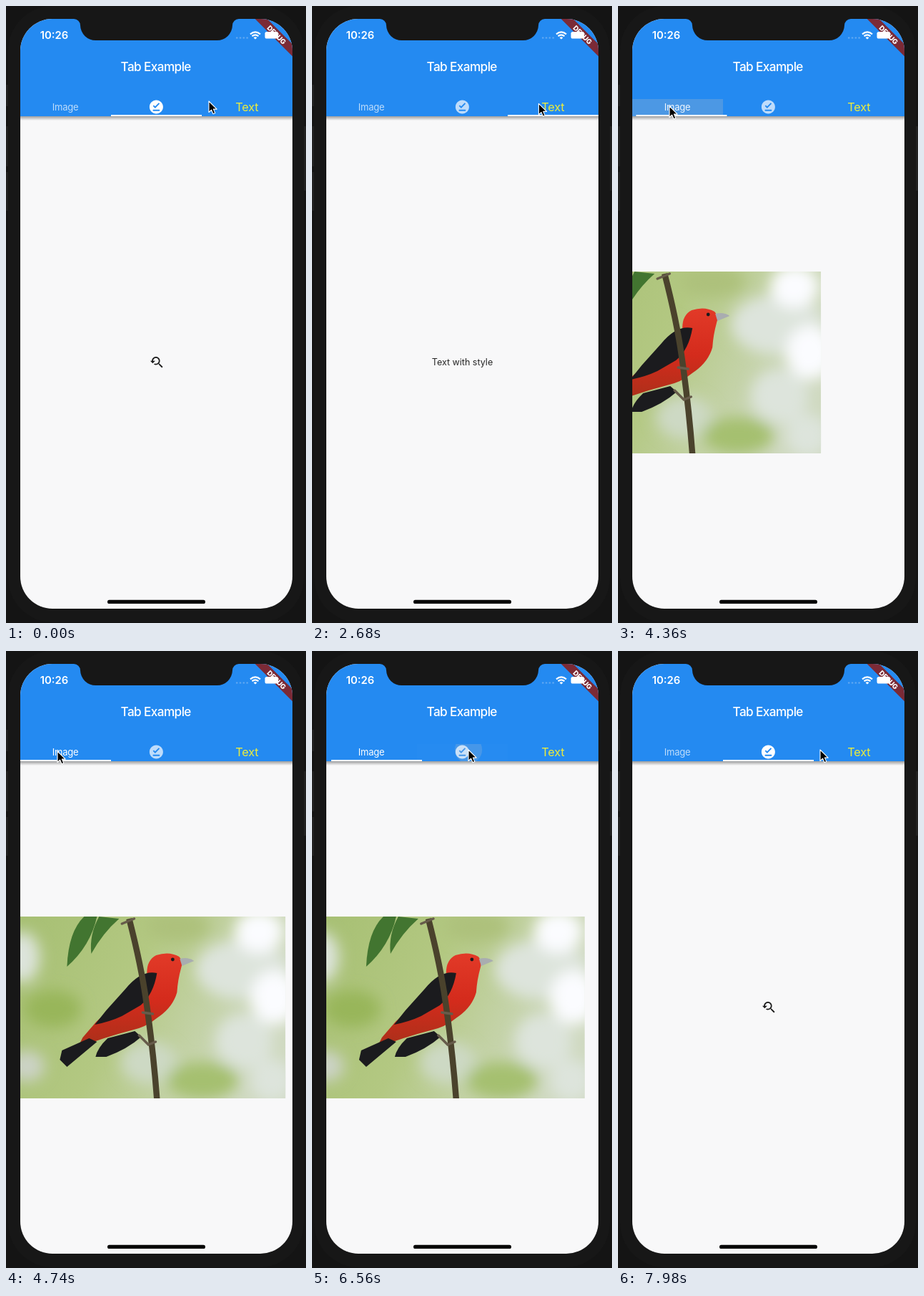
Animation, 420 px wide and 862 px high, one loop 8000 ms. Source, as an HTML page:

```html
<!DOCTYPE html>
<html lang="en">
<head>
<meta charset="utf-8">
<title>Tab Example</title>
<style>
  html, body { margin: 0; width: 100%; height: 100%; overflow: hidden; background: #141414; }
  svg { display: block; width: 100%; height: 100%; }
  text { font-family: Inter, "Open Sans", sans-serif; text-anchor: middle; }
</style>
</head>
<body>
<svg viewBox="0 0 420 862">
  <defs>
    <clipPath id="screen"><rect x="20" y="18" width="381" height="824" rx="45"/></clipPath>
    <clipPath id="photoBox"><rect x="20" y="371" width="381" height="254"/></clipPath>
    <clipPath id="tabBox"><rect id="tabRect" y="130" width="127" height="24"/></clipPath>
    <filter id="blur" x="-50%" y="-50%" width="200%" height="200%"><feGaussianBlur stdDeviation="10"/></filter>
    <linearGradient id="shade" x2="0" y2="1">
      <stop stop-color="#444" stop-opacity=".5"/>
      <stop offset="1" stop-color="#444" stop-opacity="0"/>
    </linearGradient>
    <linearGradient id="meadow" x2="1" y2=".3">
      <stop stop-color="#a6bf72"/>
      <stop offset=".5" stop-color="#b3c882"/>
      <stop offset="1" stop-color="#cfd9c0"/>
    </linearGradient>
    <linearGradient id="plumage" x2="0" y2="1">
      <stop stop-color="#e23a28"/>
      <stop offset=".5" stop-color="#d42b1c"/>
      <stop offset="1" stop-color="#a8301a"/>
    </linearGradient>
  </defs>

  <!-- phone body -->
  <rect width="420" height="862" fill="#141414"/>
  <g fill="#202020">
    <rect y="110" width="4" height="30"/>
    <rect y="168" width="4" height="56"/>
    <rect y="232" width="4" height="54"/>
    <rect x="416" y="168" width="4" height="90"/>
  </g>
  <rect x="3" y="0" width="414" height="861" rx="62" fill="#171717"/>

  <g clip-path="url(#screen)">
    <rect x="20" y="18" width="381" height="824" fill="#f8f8f9"/>

    <!-- pages -->
    <g id="page0">
      <g clip-path="url(#photoBox)">
        <rect x="20" y="371" width="381" height="254" fill="url(#meadow)"/>
        <g filter="url(#blur)">
          <g fill="#dde4dc">
            <ellipse cx="32" cy="428" rx="25" ry="36"/>
            <ellipse cx="340" cy="445" rx="65" ry="42"/>
            <ellipse cx="343" cy="545" rx="40" ry="38"/>
            <ellipse cx="382" cy="600" rx="30" ry="30"/>
            <ellipse cx="210" cy="575" rx="40" ry="30" fill="#cdd9c4"/>
            <ellipse cx="38" cy="580" rx="26" ry="22" fill="#ccd3c6"/>
          </g>
          <ellipse cx="75" cy="500" rx="40" ry="26" fill="#98b65a"/>
          <ellipse cx="285" cy="600" rx="50" ry="26" fill="#a5c070"/>
          <ellipse cx="250" cy="385" rx="45" ry="22" fill="#adc17c"/>
          <ellipse cx="364" cy="392" rx="34" ry="30" fill="#fbfcff"/>
          <ellipse cx="386" cy="484" rx="34" ry="38" fill="#fbfcff"/>
        </g>
        <g fill="#427530">
          <path d="M119 371Q97 392 95 441Q128 412 137 371z"/>
          <path d="M140 371Q126 396 129 423Q145 394 168 374z"/>
        </g>
        <path d="M190 531L152 541Q138 554 135 567L150 567Q180 556 199 539z" fill="#1b1b1e"/>
        <path d="M207 452Q206 432 220 425Q238 419 252 427Q258 434 255 442Q250 460 249 477Q243 498 222 512Q205 526 185 530Q150 539 110 554L117 540L136 518z" fill="url(#plumage)"/>
        <path d="M221 450Q199 445 177 472L150 502L134 522Q155 518 172 510L198 495Q216 480 221 450zM126 541L88 558L85 571L95 581L137 546z" fill="#1b1b1e"/>
        <path d="M253 430Q265 427 273 433L256 440z" fill="#a9adb0"/>
        <circle cx="243" cy="431" r="2.4" fill="#1b1b1e"/>
        <path d="M182 374Q199 440 206 490Q216 560 221 627" fill="none" stroke="#4a422c" stroke-width="8.5"/>
        <path d="M172 381L189 374M196 537L209 550L219 546M201 505L215 507" fill="none" stroke="#665b4a" stroke-width="3.5" stroke-linecap="round"/>
      </g>
    </g>
    <g id="page1">
      <path transform="translate(200.2 487.4) scale(.88)" fill="#1c1c1c" d="M17.01 14h-.8l-.27-.27c.98-1.14 1.57-2.61 1.57-4.23 0-3.59-2.91-6.5-6.5-6.5s-6.5 3-6.5 6.5H2l3.84 4 4.16-4H6.51C6.51 7 8.53 5 11.01 5s4.5 2.01 4.5 4.5c0 2.48-2.02 4.5-4.5 4.5-.65 0-1.26-.14-1.82-.38L7.71 15.1c.97.57 2.09.9 3.3.9 1.61 0 3.08-.59 4.22-1.57l.27.27v.79l5.01 4.99L22 19l-4.99-5z"/>
    </g>
    <g id="page2"><text x="210.5" y="502.4" font-size="12.5" fill="#262626">Text with style</text></g>

    <!-- app bar -->
    <rect x="20" y="154" width="381" height="6" fill="url(#shade)"/>
    <rect x="20" y="18" width="381" height="136" fill="#248af1"/>
    <text x="209.7" y="90.6" font-size="17.2" font-weight="500" letter-spacing="-.6" fill="#fff">Tab Example</text>
    <g clip-path="url(#tabBox)">
      <rect id="glow" y="130" width="127" height="24" fill="#bcbcbc"/>
      <circle id="splash" fill="#c8c8c8"/>
    </g>
    <text id="label0" x="83" y="145.5" font-size="13" letter-spacing="-.25" fill="#fff">Image</text>
    <path id="label1" transform="translate(199 129.6) scale(.95)" fill="#fff" d="M12 2C6.5 2 2 6.5 2 12s4.5 10 10 10 10-4.5 10-10S17.5 2 12 2zm5 16H7v-2h10v2zm-6.7-4L7 10.7l1.4-1.4 1.9 1.9 5.3-5.3L17 7.3 10.3 14z"/>
    <text x="337.3" y="147" font-size="16.3" letter-spacing="-.25" fill="#ecec3c">Text</text>
    <rect id="line" y="152" width="127" height="2" fill="#fff"/>

    <!-- ribbon, with the status bar above it -->
    <g transform="translate(401 18) rotate(45)">
      <rect x="-41" y="25" width="82" height="12" fill="#7b2a36"/>
      <text y="35" font-size="9.6" font-weight="800" letter-spacing="-.1" fill="#fff">DEBUG</text>
    </g>
    <text x="67.5" y="46.2" font-size="14.8" font-weight="600" fill="#fff">10:26</text>
    <path d="M322 44.5h17" stroke="#8cc0f6" stroke-width="2" stroke-dasharray="2.5 2.3" opacity=".6"/>
    <path d="M342 39.3Q349 33.5 356 39.3M344.5 42.2Q349 38.6 353.5 42.2" fill="none" stroke="#fff" stroke-width="2.2"/>
    <path d="M346.6 44.2Q349 42.4 351.4 44.2L349 46.6z" fill="#fff"/>
    <rect x="362.5" y="36" width="18.5" height="9.6" rx="2.6" fill="#fff"/>

    <rect x="142" y="829.8" width="137" height="5.2" rx="2.6" fill="#050505"/>
  </g>
  <path d="M95 17V18A9 9 0 0 1 104 27A21.5 21.5 0 0 0 125.5 48H295.5A21.5 21.5 0 0 0 317 27A9 9 0 0 1 326 18V17z" fill="#171717"/>

  <path id="cursor" d="M0 0V15.5L3.6 12.2L6 17.8L8.8 16.6L6.4 11.1H11.2z" fill="#000" stroke="#fff" stroke-width="1.1" stroke-linejoin="round"/>
</svg>

<script>
const LOOP = 8000, SLIDE = 18, PAGE = 381, TAB = 127, LEFT = 20;
const $ = id => document.getElementById(id);
const set = (id, attrs) => {
  for (const k in attrs) $(id).setAttribute(k, attrs[k]);
};
const clamp = x => Math.min(1, Math.max(0, x));

// Times below count ticks of 1/60 s in the app.
const taps = [
  { at: 29, from: 1, to: 2, x: 337, y: 136 },
  { at: 86.66, from: 2, to: 0, x: 72, y: 140 },
  { at: 138.8, from: 0, to: 1, x: 219, y: 138 },
];
const cursorPath = [
  [0, 284, 133], [13, 337, 136], [54, 337, 136], [78, 72, 140],
  [104, 72, 140], [118, 219, 138], [160, 219, 138], [171, 283, 138],
];

// Each group of three ticks plays for 20 + 100 + 20 ms.
function tickAt(ms) {
  const rest = ms % 140;
  return 3 * Math.floor(ms / 140) + (rest < 20 ? 0 : rest < 120 ? 1 : 2);
}

// cubic-bezier(.25, .1, .25, 1)
function ease(x) {
  x = clamp(x);
  let lo = 0, hi = 1;
  for (let i = 0; i < 24; i++) {
    const u = (lo + hi) / 2;
    if (.75 * u * (1 - u) + u ** 3 < x) lo = u; else hi = u;
  }
  const v = 1 - lo;
  return .3 * lo * v * v + 3 * lo * lo * v + lo ** 3;
}

function cursorAt(n) {
  let i = 0;
  while (i < cursorPath.length - 2 && n >= cursorPath[i + 1][0]) i++;
  const [t0, x0, y0] = cursorPath[i], [t1, x1, y1] = cursorPath[i + 1];
  const k = clamp((n - t0) / (t1 - t0)), s = k * k * (3 - 2 * k);
  return [x0 + (x1 - x0) * s, y0 + (y1 - y0) * s];
}

// The underline closes the remaining gap again on every tick.
function lineAt(n, tap) {
  let gap = 1;
  for (let k = Math.ceil(tap.at); k <= n; k++) gap *= 1 - ease((k - tap.at) / SLIDE);
  return LEFT + TAB * (tap.to + (tap.from - tap.to) * gap);
}

function drawSplash(n) {
  const tap = taps.find(t => n >= t.at - 3.6 && n < t.at + 14);
  $("glow").style.display = $("splash").style.display = tap ? "" : "none";
  if (!tap) return;
  const age = n - tap.at;
  const x = LEFT + TAB * tap.to;
  set("tabRect", { x });
  set("glow", { x, opacity: .2 * clamp((age - 1) / 5) * clamp((14 - age) / 7) });
  set("splash", {
    cx: tap.x, cy: tap.y, r: Math.min(80, age < 0 ? age + 3.6 : 3.6 + age * 13),
    opacity: .22 * clamp(1 - age / 12),
  });
}

function draw(ms) {
  const n = tickAt(ms);
  const tap = taps.filter(t => n >= t.at).pop() || { at: -99, from: 0, to: 1 };
  const p = ease((n - tap.at) / SLIDE), side = Math.sign(tap.to - tap.from);
  for (let i = 0; i < 3; i++) {
    const shift = i === tap.to ? side * (1 - p) : i === tap.from ? -side * p : 2;
    set("page" + i, { transform: `translate(${shift * PAGE} 0)` });
    if (i < 2) {
      const lit = i === tap.to ? p : i === tap.from ? 1 - p : 0;
      set("label" + i, { opacity: .7 + .3 * lit });
    }
  }
  set("line", { x: lineAt(n, tap) });
  set("cursor", { transform: `translate(${cursorAt(n)})` });
  drawSplash(n);
}

const start = performance.now();
function loop() {
  draw((performance.now() - start) % LOOP);
  requestAnimationFrame(loop);
}
loop();
</script>
</body>
</html>
```
